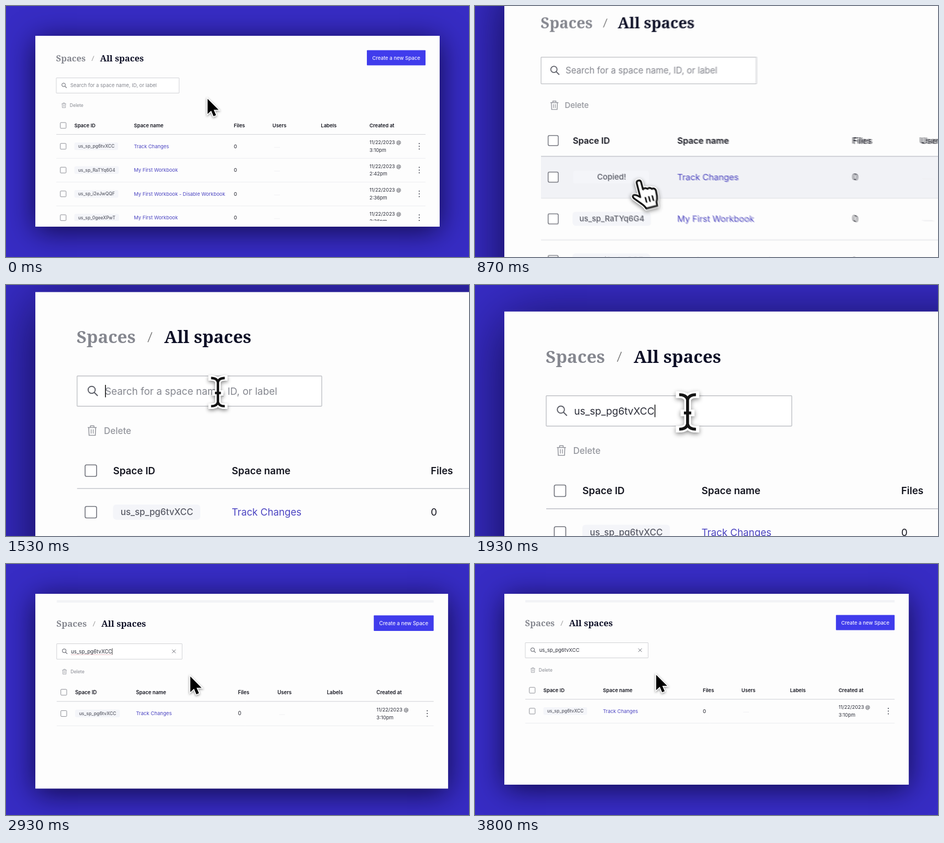
An HTML page with a canvas for the animation above (3870 ms loop, 884x480 px).

```html
<!DOCTYPE html>
<html lang="en">
<head>
<meta charset="utf-8">
<title>Search a space by ID</title>
<style>
  html, body { margin: 0; width: 100%; height: 100%; overflow: hidden; background: #372cc4; }
  canvas { display: block; width: 884px; height: 480px; }
</style>
</head>
<body>
<canvas id="stage" width="884" height="480"></canvas>
<script>
const W = 884, H = 480, LOOP = 3870, STEP = 200 / 3, STEPS = 58;
const PANEL = { x: 56, y: 57, w: 772, h: 365 };
const SANS = 'Inter, sans-serif', SERIF = '"Noto Serif", serif';
const INK = '#14151f', GREY = '#85878f', LINK = '#4c45c2', TINT = '#f4f5f9';

// Moments at which the interface changes, in ms
const AT = {
  hand: 470, copied: 820, leave: 1080, focus: 1480, paste: 1870,
  arrow: 2130, filter: 2180, loaded: 2700, blur: 3370
};
const ROWS = [
  ['us_sp_pg6tvXCC', 'Track Changes', '3:10pm'],
  ['us_sp_RaTYq6G4', 'My First Workbook', '2:42pm'],
  ['us_sp_i2eJwQQF', 'My First Workbook - Disable Workbook', '2:36pm'],
  ['us_sp_0geeXPwT', 'My First Workbook', '2:36pm']
];
const COLUMNS = [
  ['Space ID', 130.5], ['Space name', 244.3], ['Files', 435],
  ['Users', 508.7], ['Labels', 601.3], ['Created at', 694]
];

const screen = document.getElementById('stage').getContext('2d');
const layer = document.createElement('canvas');
layer.width = W;
layer.height = H;
const g = layer.getContext('2d');

const within = (t, from, to) => t >= from && t < to;

// Critically damped spring from 0 to 1
function spring(t, start, rate) {
  const x = Math.max(0, t - start) * rate;
  return 1 - (1 + x) * Math.exp(-x);
}

function track(t, keys) {
  for (let i = 1; i < keys.length; i++) {
    const [t0, a] = keys[i - 1], [t1, b] = keys[i];
    if (t < t1) {
      const u = Math.max(0, (t - t0) / (t1 - t0));
      return a + (b - a) * u * u * (3 - 2 * u);
    }
  }
  return keys[keys.length - 1][1];
}

function camera(t) {
  const scale = 1 + spring(t, 436, 0.0063) - spring(t, 1936, 0.0058);
  const pan = spring(t, 1167, 0.0063);
  return { scale, top: PANEL.y - 133 * (scale - 1) * (1 - pan) };
}

function pointer(t) {
  return {
    x: track(t, [[0, 384], [560, 207], [1000, 200.5], [1060, 200.5], [1480, 231], [1950, 231], [2570, 345]]),
    y: track(t, [[0, 176], [560, 273], [1060, 271.5], [1480, 153], [1950, 153], [2700, 210.5]])
  };
}

function text(str, x, y, size, color, weight = 400, family = SANS) {
  g.font = `${weight} ${size}px ${family}`;
  g.fillStyle = color;
  g.fillText(str, x, y);
  return g.measureText(str).width;
}

function line(color, width, ...points) {
  g.beginPath();
  points.forEach(([x, y], i) => i ? g.lineTo(x, y) : g.moveTo(x, y));
  g.strokeStyle = color;
  g.lineWidth = width;
  g.stroke();
}

function box(x, y, w, h, r, fill, stroke, width = 0.8) {
  g.beginPath();
  g.roundRect(x, y, w, h, r);
  if (fill) { g.fillStyle = fill; g.fill(); }
  if (stroke) { g.strokeStyle = stroke; g.lineWidth = width; g.stroke(); }
}

function arc(x, y, r, color, width, from = 0, to = 7) {
  g.beginPath();
  g.arc(x, y, r, from, to);
  g.strokeStyle = color;
  g.lineWidth = width;
  g.stroke();
}

const checkbox = cy => box(103.7, cy - 5.5, 11, 11, 1.4, '#fff', '#6d6f78');

function drawHeading() {
  text('Spaces', 95.5, 106, 16.6, GREY, 700, SERIF);
  line('#777', 0.8, [163.9, 105], [167.8, 95.5]);
  text('All spaces', 179.5, 106, 16.6, '#0c0e25', 700, SERIF);
  box(689, 84.5, 112, 29, 1, '#403cec');
  g.textAlign = 'center';
  text('Create a new Space', 745, 102.7, 9.6, '#f1f0ff', 500);
  g.textAlign = 'left';
}

function drawSearch(t) {
  box(96, 137.5, 234.5, 29, 0.5, '#fff', '#bdbfc4', 0.7);
  arc(110, 150.8, 3.4, '#5d5f68', 1);
  line('#5d5f68', 1.1, [112.5, 153.3], [115.8, 156.6]);

  let end = 122.7;
  if (t < AT.paste) {
    text('Search for a space name, ID, or label', 122.7, 155.4, 9.5, GREY);
  } else {
    end += text(ROWS[0][0], 122.7, 155.4, 9.5, '#2b2d38');
    if (within(t, AT.paste + 200, AT.blur)) {
      g.setLineDash([1, 1]);
      line('#d0707c', 0.9, [122.7, 157.9], [end, 157.9]);
      g.setLineDash([]);
    }
  }

  const sinceEdit = t - (t < AT.paste ? AT.focus : AT.paste);
  if (t >= AT.focus && sinceEdit % 1000 < 500) {
    line('#111', 0.8, [end + 0.5, 146], [end + 0.5, 158]);
  }

  if (within(t, AT.paste + 100, AT.loaded)) {
    const spin = (t - 2400) / 130;
    arc(316, 151.5, 4.2, '#e6e6f2', 1.2);
    arc(316, 151.5, 4.2, '#4a44d4', 1.2, spin - 1.6, spin);
  } else if (t >= AT.loaded) {
    line('#555862', 0.9, [311.8, 148.5], [318.4, 155.1]);
    line('#555862', 0.9, [318.4, 148.5], [311.8, 155.1]);
  }
}

function drawDelete() {
  const c = '#94969d';
  line(c, 0.8, [106.2, 187], [114.8, 187]);
  line(c, 0.8, [108.7, 187], [108.9, 185.3], [112.1, 185.3], [112.3, 187]);
  line(c, 0.8, [107.2, 187], [107.5, 194.5], [113.5, 194.5], [113.8, 187]);
  line(c, 0.7, [109.5, 188.7], [109.5, 192.8]);
  line(c, 0.7, [111.5, 188.7], [111.5, 192.8]);
  text('Delete', 121.8, 193, 8.5, c, 500);
}

function drawId(id, cy, hovered, copied) {
  const color = '#595b66';
  g.font = `500 8.5px ${SANS}`;
  const width = g.measureText(id).width + 14;
  if (copied || !hovered) box(130.5, cy - 7.4, width, 14.6, 3, TINT);
  if (copied) {
    text('Copied!', 157, cy + 2.7, 8.5, color, 500);
  } else if (hovered) {
    const fade = g.createLinearGradient(176, 0, 190, 0);
    fade.addColorStop(0, color);
    fade.addColorStop(1, 'rgba(89,91,102,0)');
    text(id, 137.7, cy + 2.7, 8.5, fade, 500);
    box(199, cy - 4.8, 6, 7, 1.3, null, '#85878f');
    box(197, cy - 2.8, 6, 7, 1.3, TINT, '#85878f');
  } else {
    text(id, 137.7, cy + 2.7, 8.5, color, 500);
  }
}

function drawRow([id, name, time], i, t, hovered) {
  const cy = 268.3 + 45.5 * i;
  if (hovered) box(96, cy - 22.5, 705, 45.5, 0, '#f1f2f6');
  checkbox(cy);
  drawId(id, cy, hovered, i === 0 && within(t, AT.copied, AT.focus));
  text(name, 244.3, cy + 3.3, 9.4, LINK);
  text('0', 435, cy + 3.3, 9.6, INK);
  line('#f0f0f3', 1, [512, cy + 2], [523, cy + 2]);
  text('11/22/2023 @', 694, cy - 3.9, 9.3, '#2b2d38');
  text(time, 694, cy + 10.6, 9.3, '#2b2d38');
  for (const dy of [-5.2, 0, 5.2]) box(787.9, cy + dy - 1.1, 2.2, 2.2, 1.1, '#50525c');
  line('#e8e9ed', 0.8, [96, cy + 23], [801, cy + 23]);
}

function drawPage(t) {
  const filtered = t >= AT.filter;
  const hoverFirst = pointer(t).y > 246 && t < AT.leave;
  g.save();
  g.beginPath();
  g.rect(PANEL.x, PANEL.y, PANEL.w, 354);
  g.clip();
  if (filtered) {
    box(96, 69, 705, 4.5, 0, '#f2f3f6');
    g.translate(0, 13);
  }
  drawHeading();
  drawSearch(t);
  drawDelete();
  checkbox(228.4);
  for (const [label, x] of COLUMNS) text(label, x, 231.9, 9.45, INK, 600);
  (filtered ? ROWS.slice(0, 1) : ROWS).forEach((row, i) => drawRow(row, i, t, i === 0 && hoverFirst));
  line('#c3c5cc', 0.8, [96, 245.6], [801, 245.6]);
  g.restore();
}

const ARROW = new Path2D('M0 0V17L4 13.3L6.6 19.4L9.4 18.2L6.8 12.3H12.2Z');
const HAND = new Path2D('M5 9V1.5Q5 0 6.4 0T7.8 1.5V6Q9.2 4.9 10.6 6.4Q12.2 5.5 13.2 7.1Q15 6.6 15.4 8.6' +
  'L15.2 12Q15 14 14 15.5L13.8 18H6.8Q6.5 16.5 4.8 14.5L1 10Q0 8.4 1.4 8Q2.6 7.8 5 10.2Z');
const KNUCKLES = new Path2D('M8 11V14.5M10.2 11V14.5M12.4 11V14.5');
const BEAM = new Path2D('M-8 -16.5Q-1 -16.5 0 -11.5Q1 -16.5 8 -16.5M0 -12V12' +
  'M-8 16.5Q-1 16.5 0 11.5Q1 16.5 8 16.5M-3.5 1H3.5');

function drawPointer(t, zoom) {
  const { x, y } = pointer(t);
  const press = [780, 1530].reduce((p, c) => p + Math.exp(-(((t - c) / 110) ** 2)), 0);
  const size = 1 - 0.18 * press;
  const outline = (path, color, width) => {
    g.strokeStyle = color;
    g.lineWidth = width;
    g.stroke(path);
  };
  const shadow = on => {
    g.shadowColor = on ? 'rgba(0,0,0,.45)' : 'transparent';
    g.shadowBlur = 4 * zoom;
    g.shadowOffsetY = 1.5 * zoom;
  };

  g.save();
  g.translate(x, y);
  g.scale(size, size);
  g.lineJoin = 'round';
  shadow(true);
  if (within(t, AT.hand, AT.leave)) {
    g.rotate(-0.25);
    g.scale(1.95, 1.95);
    g.translate(-6.4, 0);
    outline(HAND, '#fff', 2.4);
    shadow(false);
    g.fillStyle = '#fff';
    g.fill(HAND);
    outline(HAND, '#111', 1.1);
    outline(KNUCKLES, '#111', 0.9);
  } else if (within(t, AT.leave, AT.arrow)) {
    g.lineCap = 'square';
    outline(BEAM, '#fff', 6.4);
    shadow(false);
    g.lineCap = 'butt';
    outline(BEAM, '#141414', 2.8);
  } else {
    g.scale(1.72, 1.72);
    g.translate(0.5, 0.8);
    g.lineJoin = 'miter';
    outline(ARROW, '#fff', 1.9);
    shadow(false);
    g.fillStyle = '#000';
    g.fill(ARROW);
  }
  g.restore();
}

function drawScene(t) {
  const { scale, top } = camera(t);
  g.setTransform(1, 0, 0, 1, 0, 0);
  g.fillStyle = '#372cc4';
  g.fillRect(0, 0, W, H);
  g.translate(PANEL.x, top);
  g.scale(scale, scale);
  g.translate(-PANEL.x, -PANEL.y);

  g.save();
  g.shadowColor = 'rgba(10,5,50,.85)';
  g.shadowBlur = 52 * scale;
  g.shadowOffsetY = 8 * scale;
  box(PANEL.x, PANEL.y, PANEL.w, PANEL.h, 0, '#fdfdfd');
  g.restore();

  drawPage(t);
  drawPointer(t, scale);
}

// Motion blur for fast camera moves: average several moments inside a short shutter
function render(t) {
  const SHUTTER = 12;
  const a = camera(t - SHUTTER / 2), b = camera(t + SHUTTER / 2);
  const travel = 700 * Math.abs(b.scale - a.scale) + Math.abs(b.top - a.top);
  const samples = travel > 5 ? 9 : 1;
  for (let i = 0; i < samples; i++) {
    drawScene(samples > 1 ? t + SHUTTER * (i / (samples - 1) - 0.5) : t);
    screen.globalAlpha = 1 / (i + 1);
    screen.drawImage(layer, 0, 0);
  }
}

let shown = -1;
const start = performance.now();
function tick() {
  const t = (performance.now() - start) % LOOP;
  const step = Math.floor((t + 4) / STEP) % STEPS;
  if (step !== shown) {
    shown = step;
    render(step * STEP);
  }
  requestAnimationFrame(tick);
}
tick();
</script>
</body>
</html>
```
